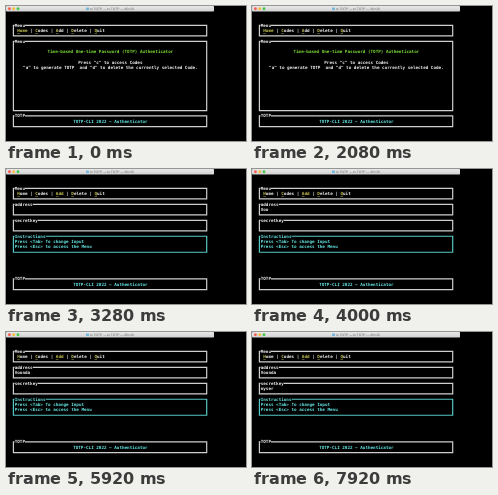
An HTML page that plays this animation: 240 by 135 pixels, repeating every 8000 ms.

```html
<!DOCTYPE html>
<html lang="en">
<head>
<meta charset="utf-8">
<title>TOTP terminal</title>
<style>
  html, body { margin: 0; width: 100%; height: 100%; overflow: hidden; background: #000; }
  svg { display: block; width: 100vw; height: 100vh; }
  text { font: bold 4.285px "DejaVu Sans Mono", monospace; white-space: pre; text-rendering: geometricPrecision; }
  .bar { font: 3.3px "Liberation Sans", sans-serif; fill: #666; }
</style>
</head>
<body>
<svg id="stage" viewBox="0 0 240 135" preserveAspectRatio="none"></svg>
<script>
const LOOP = 8000, COL = 2.58, ROW = 5.33, LEFT = 7.4, RIGHT = 200.7, TOP = 19.3, MID = 104.4;
const WHITE = '#f2f2f2', CYAN = '#66e8e6', YELLOW = '#c9c451', GREEN = '#7ee035';
const stage = document.getElementById('stage');
const rowY = row => TOP + row * ROW;

function add(parent, tag, attrs = {}, content = '') {
  const el = document.createElementNS('http://www.w3.org/2000/svg', tag);
  for (const key in attrs) el.setAttribute(key, attrs[key]);
  el.textContent = content;
  return parent.appendChild(el);
}

function write(parent, row, content, fill = WHITE, x = MID, anchor = 'middle') {
  return add(parent, 'text', { x, y: rowY(row) + 1.5, fill, 'text-anchor': anchor }, content);
}

const writeLeft = (parent, row, content, fill) =>
  write(parent, row, content, fill, LEFT + COL / 2, 'start');

function box(parent, row, rows, label, color = WHITE) {
  const y = rowY(row), gap = LEFT + COL * (label.length + 0.5);
  add(parent, 'path', {
    d: `M${LEFT + 1.1} ${y}H${LEFT}V${rowY(row + rows)}H${RIGHT}V${y}H${gap}`,
    fill: 'none', stroke: color, 'stroke-width': 1.2, 'stroke-opacity': 0.85
  });
  writeLeft(parent, row, label, color);
}

// Window title bar
add(stage, 'rect', { width: 240, height: 135 });
const shade = add(stage, 'linearGradient', { id: 'shade', x2: 0, y2: 1 });
add(shade, 'stop', { 'stop-color': '#e8e8e8' });
add(shade, 'stop', { offset: 1, 'stop-color': '#d2d2d2' });
add(stage, 'rect', { width: 208, height: 5.5, rx: 0.8, fill: 'url(#shade)' });
['#f75f56', '#f5bd3c', '#45c84a'].forEach((fill, i) =>
  add(stage, 'circle', { cx: 3.4 + i * 4.3, cy: 2.8, r: 1.45, fill }));
add(stage, 'rect', { x: 80, y: 1.6, width: 3, height: 2.4, rx: 0.3, fill: '#72b9dd' });
add(stage, 'text', { x: 106, y: 4, class: 'bar', 'text-anchor': 'middle' }, 'ts TOTP — ts TOTP — 80×20');

// Parts shared by both pages
box(stage, 0, 2, 'Menu');
const menu = write(stage, 1, '', WHITE, LEFT + COL * 1.5, 'start');
const items = ['Home', 'Codes', 'Add', 'Delete', 'Quit'].map((name, i) => {
  if (i) add(menu, 'tspan', {}, ' | ');
  const item = add(menu, 'tspan');
  add(item, 'tspan', { 'text-decoration': 'underline', fill: YELLOW }, name[0]);
  add(item, 'tspan', {}, name.slice(1));
  return item;
});
box(stage, 17, 2, 'TOTP');
write(stage, 18, 'TOTP-CLI 2022 — Authenticator', CYAN);

const home = add(stage, 'g');
box(home, 3, 13, 'Menu');
write(home, 5, 'Time-based One-time Password (TOTP) Authenticator', GREEN);
write(home, 7, 'Press "c" to access Codes');
write(home, 8, '"a" to generate TOTP  and "d" to delete the currently selected Code.');

const form = add(stage, 'g');
box(form, 3, 2, 'address');
box(form, 6, 2, 'secretkey');
box(form, 9, 3, 'Instructions', CYAN);
writeLeft(form, 10, 'Press <Tab> To change Input', CYAN);
writeLeft(form, 11, 'Press <Esc> to access the Menu', CYAN);

const fields = [
  { text: 'Voonda', times: [3440, 3760, 3920, 4240, 4480, 4720], el: writeLeft(form, 4, '') },
  { text: 'myser', times: [6400, 6640, 7280, 7520, 7840], el: writeLeft(form, 7, '') }
];

function draw(time) {
  const adding = time >= 2160;
  home.setAttribute('display', adding ? 'none' : 'inline');
  form.setAttribute('display', adding ? 'inline' : 'none');
  items.forEach((item, i) => item.setAttribute('fill', i === (adding ? 2 : 0) ? YELLOW : WHITE));

  for (const { text, times, el } of fields)
    el.textContent = text.slice(0, times.filter(t => time >= t).length);
}

const start = performance.now();
function tick() {
  draw((performance.now() - start) % LOOP);
  requestAnimationFrame(tick);
}
draw(0);
requestAnimationFrame(tick);
</script>
</body>
</html>
```
